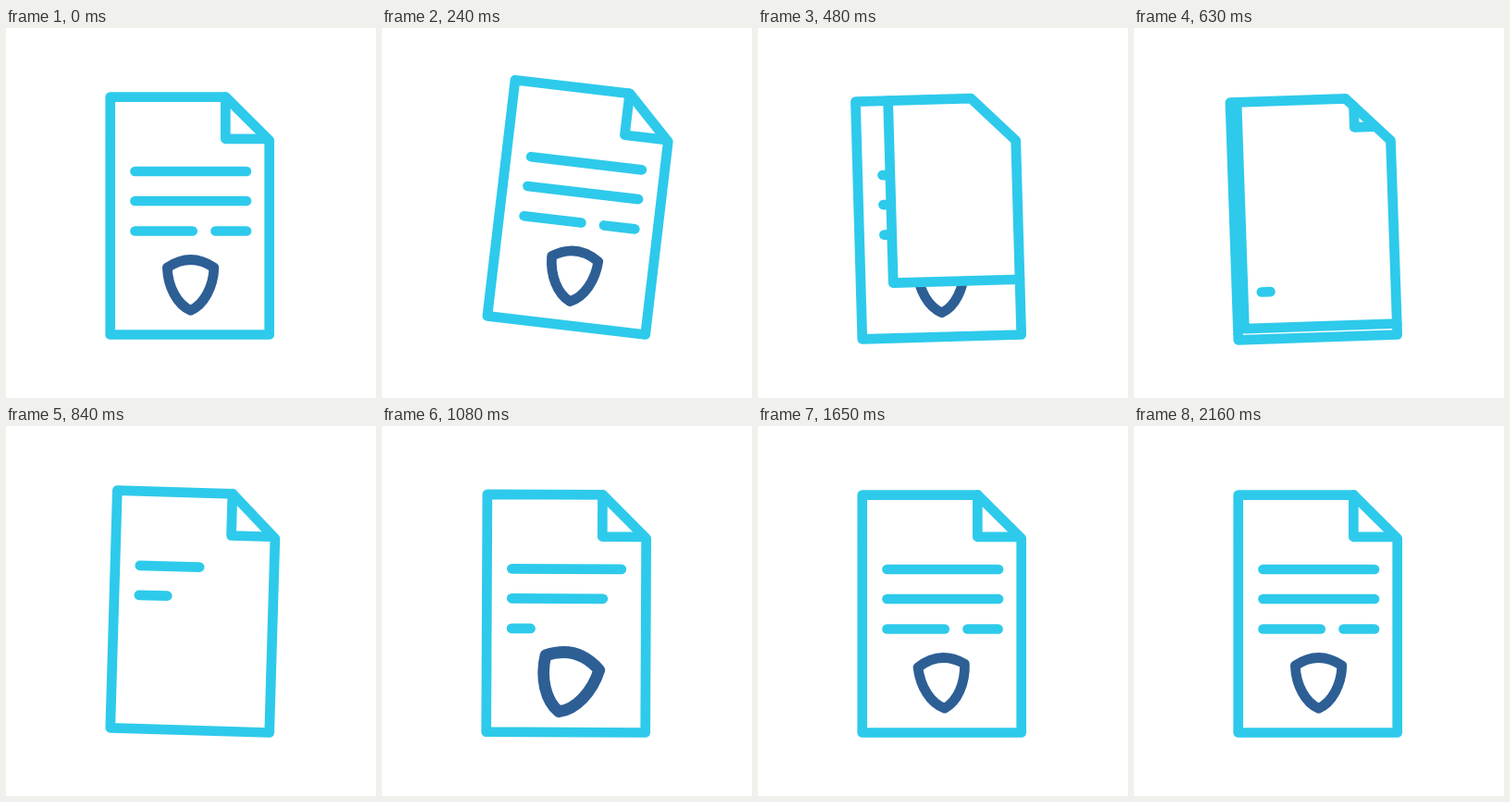
Write an HTML page with a canvas that moves like this. It is 400 px wide and 400 px high and loops after 2250 ms.

```html
<!DOCTYPE html>
<html lang="en">
<head>
<meta charset="utf-8">
<title>Document turning a page</title>
<style>
  html, body { margin: 0; width: 100%; height: 100%; overflow: hidden; background: #fff; }
  canvas { display: block; width: 400px; height: 400px; }
</style>
</head>
<body>
<canvas id="stage" width="400" height="400"></canvas>
<script>
const ctx = document.getElementById('stage').getContext('2d');
const LOOP = 2250, STEP = 30, LAST = 2160;
const CYAN = '#2ecaeb', BLUE = '#2d5f95', WEIGHT = 10.7;

const page = { left: 112.7, top: 74.6, right: 284.7, bottom: 331.5, cutX: 237.5, cutY: 121.5 };
const fold = { x: 237.3, y: 119.8 };
const shieldAt = { x: 199.6, y: 278 };

// Text strokes: left, right, y and the moment each starts to be written
const rows = [
  [139.5, 260, 155, 526],
  [139.5, 260, 187, 643],
  [139.5, 201.7, 219.5, 849],
  [226.5, 260, 219.5, 1090]
];
const ROW_TIME = 600;

// Swings as [time, value] turning points
const pageSwing = [[0, 0], [275, 7], [545, -3], [820, 1.7], [1170, 0]];
const shieldSwing = [[840, 0], [1120, 16], [1500, -9], [1850, 3], [2150, 0]];
const shieldSize = [[840, 0], [1060, 1.19], [1300, 1]];

const span = (t, from, to) => Math.min(1, Math.max(0, (t - from) / (to - from)));
const mix = (a, b, k) => a + (b - a) * k;
const smooth = k => k * k * (3 - 2 * k);
const sine = k => (1 - Math.cos(Math.PI * k)) / 2;
const easeOut = k => 1 - (1 - k) * (1 - k);
const rad = deg => deg * Math.PI / 180;

function track(points, t) {
  if (t <= points[0][0]) return points[0][1];
  for (let i = 1; i < points.length; i++) {
    const [t0, a] = points[i - 1], [t1, b] = points[i];
    if (t < t1) return mix(a, b, sine(span(t, t0, t1)));
  }
  return points[points.length - 1][1];
}

function stroke(color, ...pts) {
  ctx.strokeStyle = color;
  ctx.beginPath();
  pts.forEach(([x, y]) => ctx.lineTo(x, y));
  ctx.stroke();
}

function drawShield(angle, size) {
  if (size <= 0) return;
  ctx.save();
  ctx.translate(shieldAt.x, shieldAt.y);
  ctx.rotate(rad(angle));
  ctx.scale(size, size);
  ctx.strokeStyle = BLUE;
  ctx.beginPath();
  ctx.moveTo(-25.3, -19);
  ctx.quadraticCurveTo(0, -36, 25.3, -19);
  ctx.bezierCurveTo(24.5, 2, 14.5, 21, 0, 27.3);
  ctx.bezierCurveTo(-14.5, 21, -24.5, 2, -25.3, -19);
  ctx.closePath();
  ctx.stroke();
  ctx.restore();
}

function drawOldContent() {
  for (const [x0, x1, y] of rows) stroke(CYAN, [x0, y], [x1, y]);
  drawShield(0, 1);
}

function drawNewContent(t) {
  const rise = 160 * (1 - smooth(span(t, 540, 840)));
  for (const [x0, x1, y, start] of rows) {
    const k = smooth(span(t, start, start + ROW_TIME));
    if (k > 0) stroke(CYAN, [x0, y + rise], [mix(x0, x1, k), y + rise]);
  }
  drawShield(track(shieldSwing, t), track(shieldSize, t));
}

// Keeps drawing inside the turned part of the sheet, or outside of it
function within(x, y, inside, draw) {
  ctx.save();
  ctx.beginPath();
  ctx.rect(x, 0, 500, y);
  if (!inside) ctx.rect(-100, -100, 700, 700);
  ctx.clip('evenodd');
  draw();
  ctx.restore();
}

function drawNewFold(t) {
  const k = smooth(span(t, 510, 750));
  if (k <= 0) return;
  const x = mix(254.8, fold.x, k), y = mix(92, fold.y, k);
  const slope = (page.cutY - page.top) / (page.right - page.cutX);
  const topY = page.top + (x - page.cutX) * slope;
  const endX = Math.min(279.5, page.cutX + (y - page.top) / slope - 2);
  stroke(CYAN, [x, topY], [x, y], [Math.max(x, endX), y]);
}

function render(t) {
  ctx.fillStyle = '#fff';
  ctx.fillRect(0, 0, 400, 400);
  ctx.lineWidth = WEIGHT;
  ctx.lineCap = ctx.lineJoin = 'round';

  ctx.save();
  ctx.translate(page.right, page.bottom);
  ctx.rotate(rad(track(pageSwing, t)));
  ctx.translate(-page.right, -page.bottom);

  const turn = easeOut(span(t, 240, 752));
  const x = mix(fold.x, page.left, turn), y = mix(fold.y, page.bottom, turn);
  if (turn < 1) {
    within(x, y, false, drawOldContent);
    if (turn > 0) within(x, y, true, () => drawNewContent(t));
    stroke(CYAN, [x, page.top], [x, y], [mix(279.5, page.right, Math.min(1, turn * 4)), y]);
  } else {
    drawNewContent(t);
  }
  drawNewFold(t);

  stroke(CYAN, [page.left, page.top], [page.cutX, page.top], [page.right, page.cutY],
    [page.right, page.bottom], [page.left, page.bottom], [page.left, page.top]);
  ctx.restore();
}

const begin = performance.now();
function tick() {
  const t = (performance.now() - begin) % LOOP;
  render(Math.min(LAST, Math.floor(t / STEP) * STEP));
  requestAnimationFrame(tick);
}
tick();
</script>
</body>
</html>
```
